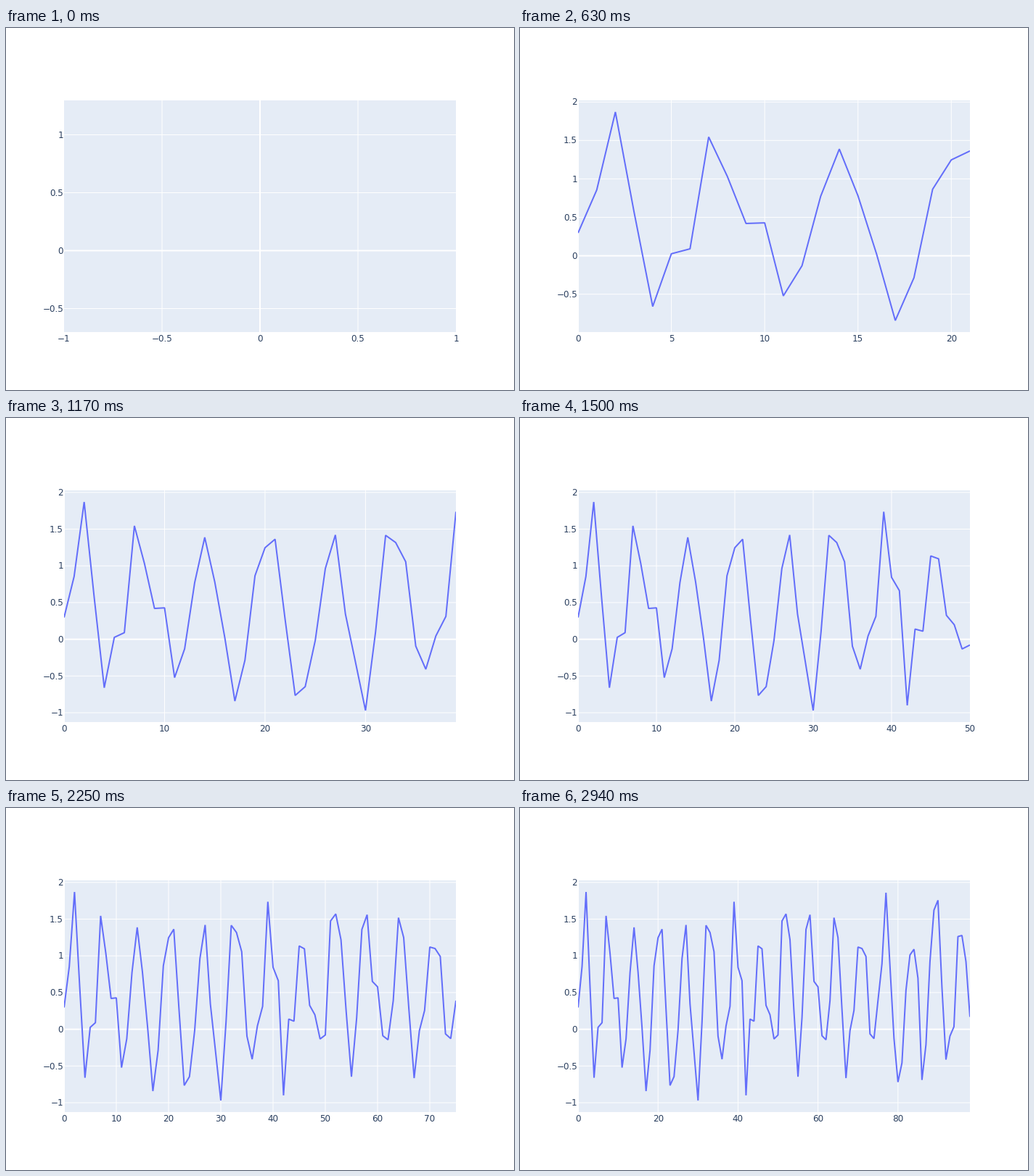
Write a matplotlib script that moves like this. It is 700 by 500 pixels and loops after 2.97 s.

```python
import math

import matplotlib.pyplot as plt
import numpy as np
from matplotlib.animation import FuncAnimation
from matplotlib.collections import LineCollection
from matplotlib.patches import Rectangle

W, H, DPI = 700, 500, 100
PX = 72 / DPI
LEFT, TOP, WIDTH, HEIGHT = 80, 100, 540, 320
PAD = 16
MAX_LABELS = 16
BG, INK, BLUE = "#E5ECF6", "#2A3F5F", "#636EFA"

# Noisy sine wave, sampled at 0, 1, 2, ...
Y = np.array([
    .297, .855, 1.87, .57, -.66, .026, .09, 1.545, 1.032, .42,
    .428, -.522, -.13, .773, 1.388, .78, .02, -.842, -.286, .865,
    1.247, 1.363, .27, -.765, -.645, -.015, .963, 1.421, .345, -.31,
    -.97, .1, 1.416, 1.318, 1.056, -.093, -.408, .045, .312, 1.737,
    .844, .662, -.9, .139, .11, 1.135, 1.096, .326, .198, -.132,
    -.078, 1.475, 1.571, 1.219, .235, -.646, .157, 1.36, 1.56, .652,
    .578, -.088, -.143, .39, 1.52, 1.249, .27, -.665, -.02, .257,
    1.12, 1.1, .992, -.063, -.127, .39, .893, 1.86, .86, -.12,
    -.719, -.458, .53, 1.012, 1.09, .696, -.69, -.21, .92, 1.623,
    1.757, .57, -.413, -.093, .035, 1.263, 1.278, .923, .169])


def tick_step(span, count):
    rough = span / count
    base = 10 ** math.floor(math.log10(rough))
    return base * next(m for m in (2, 5, 10) if m >= rough / base)


def ticks(lo, hi, count):
    step = tick_step(hi - lo, count)
    first = math.ceil(lo / step - 1e-6)
    last = math.floor(hi / step + 1e-6)
    return [round(i * step, 6) for i in range(first, last + 1)]


def ranges(n):
    if n == 0:
        return (-1, 1), (Y[0] - 1, Y[0] + 1)
    lo, hi = Y[:n + 1].min(), Y[:n + 1].max()
    pad = (hi - lo) * PAD / (HEIGHT - 2 * PAD)
    return (0, n), (lo - pad, hi + pad)


def label(value):
    return f"{value:g}".replace("-", "\u2212")


fig = plt.figure(figsize=(W / DPI, H / DPI), dpi=DPI, facecolor="white")
ax = fig.add_axes([0, 0, 1, 1])
ax.set_xlim(0, W)
ax.set_ylim(H, 0)
ax.axis("off")

ax.add_patch(Rectangle((LEFT, TOP), WIDTH, HEIGHT, fc=BG, ec="none", zorder=0))
frame = Rectangle((LEFT, TOP), WIDTH, HEIGHT, transform=ax.transData)
grid = LineCollection([], colors="white", zorder=1, capstyle="butt")
grid.set_snap(False)
ax.add_collection(grid, autolim=False)
curve, = ax.plot([], [], color=BLUE, lw=2 * PX, zorder=2, snap=False,
                 solid_joinstyle="bevel", solid_capstyle="butt")
curve.set_clip_path(frame)
curve.get_path().should_simplify = False


def make_labels(ha):
    return [ax.text(0, 0, "", ha=ha, va="baseline", color=INK,
                    family="DejaVu Sans", fontsize=12 * PX)
            for _ in range(MAX_LABELS)]


x_labels, y_labels = make_labels("center"), make_labels("right")


def fill(pool, items):
    for text in pool:
        text.set_text("")
    for text, (value, pos) in zip(pool, items):
        text.set_text(label(value))
        text.set_position(pos)


def update(n):
    (x0, x1), (y0, y1) = ranges(n)

    def px(x):
        return LEFT + (x - x0) / (x1 - x0) * WIDTH

    def py(y):
        return TOP + (y1 - y) / (y1 - y0) * HEIGHT

    xt = ticks(x0, x1, WIDTH / 80 + 1)
    yt = ticks(y0, y1, HEIGHT / 40 + 1)

    # Grid lines on the border are left out; zero lines are always kept.
    lines = []
    for v in xt:
        x = px(v)
        if v == 0 or LEFT + 1 < x < LEFT + WIDTH - 1:
            lines.append((v, [(x, TOP), (x, TOP + HEIGHT)]))
    for v in yt:
        y = py(v)
        if v == 0 or TOP + 1 < y < TOP + HEIGHT - 1:
            lines.append((v, [(LEFT, y), (LEFT + WIDTH, y)]))
    grid.set_segments([seg for _, seg in lines])
    grid.set_linewidths([(2 if v == 0 else 1) * PX for v, _ in lines])

    fill(x_labels, [(v, (px(v), TOP + HEIGHT + 13)) for v in xt])
    fill(y_labels, [(v, (LEFT - 1, py(v) + 4.2)) for v in yt])

    if n:
        curve.set_data(px(np.arange(n + 1)), py(Y[:n + 1]))
    else:
        curve.set_data([], [])
    return [grid, curve, *x_labels, *y_labels]


anim = FuncAnimation(fig, update, frames=len(Y), interval=30,
                     repeat=True, repeat_delay=0, blit=False)
plt.show()
```
